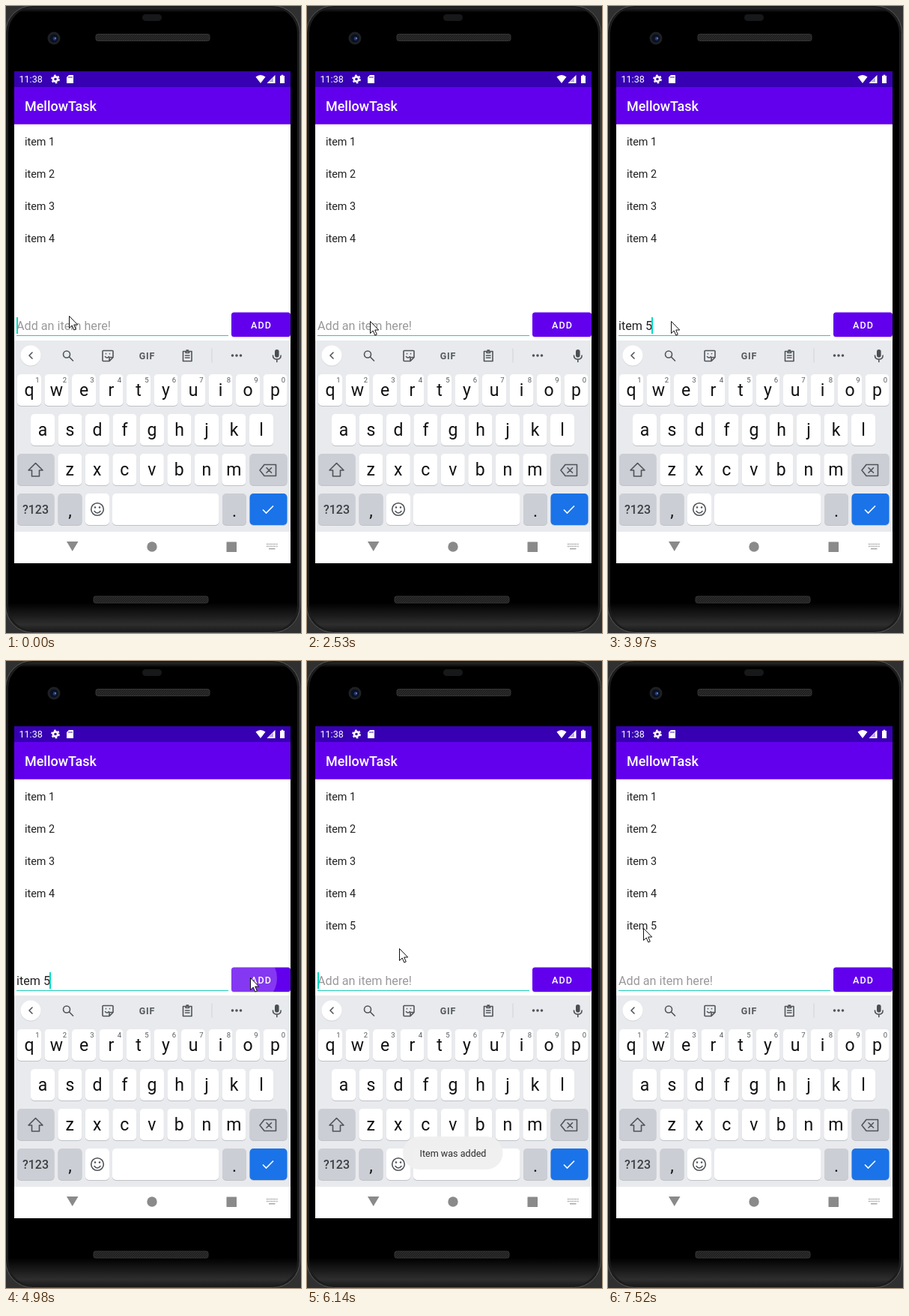
Recreate the animation shown at these times as an HTML page. Size 394 px wide and 836 px high, loop 8 s.

```html
<!DOCTYPE html>
<html lang="en">
<head>
<meta charset="utf-8">
<title>To-do list demo</title>
<style>
html, body { margin: 0; width: 100%; height: 100%; overflow: hidden; background: #303030; }
svg { display: block; position: absolute; left: 0; top: 0; }
text { font-family: Roboto, "Noto Sans", sans-serif; white-space: pre; }
.mid { text-anchor: middle; }
.medium { font-weight: 500; }
.item { font-size: 14.36px; fill: #212121; }
.field { font-size: 16.16px; fill: #212121; }
.hint { fill: #999; }
.word { font-size: 16px; fill: #5b5f64; }
.letter { font-size: 23px; fill: #111; }
.digit { font-size: 9.5px; fill: #55595e; }
.line { fill: none; stroke: #505458; stroke-width: 1.6; stroke-linejoin: round; stroke-linecap: round; }

#pointer, #caret, #ripple, #toast { animation: 8s step-end infinite; }
#pointer { animation-name: point; }
#caret { animation-name: blink; }
#ripple { animation-name: ripple; }
#toast { animation-name: toast; }

@keyframes point {
  0% { transform: translate(84px, 413px); }
  1.625% { transform: translate(84px, 420px); }
  53.375% { transform: translate(112px, 421px); }
  55.125% { transform: translate(200px, 424px); }
  57% { transform: translate(290px, 424px); }
  58.75% { transform: translate(326px, 422px); }
  69% { transform: translate(310px, 420px); }
  70.875% { transform: translate(262px, 410px); }
  72.75% { transform: translate(200px, 398px); }
  74.625% { transform: translate(150px, 388px); }
  76.75% { transform: translate(123px, 383px); }
  78.625% { transform: translate(105px, 377px); }
  80.375% { transform: translate(84px, 369px); }
  82.125% { transform: translate(66px, 362px); }
  83.75% { transform: translate(53px, 358px); }
  85.375%, 100% { transform: translate(47px, 356px); }
}
@keyframes blink {
  0%, 12%, 25%, 33.5%, 58.75%, 76.75%, 88.75% { opacity: 1; }
  6.625%, 19.625%, 31.625%, 53.375%, 72.75%, 82.125%, 94%, 100% { opacity: 0; }
}
@keyframes ripple {
  0% { r: 0; opacity: 0; }
  62.25% { r: 36px; opacity: .22; }
  63.75% { r: 60px; opacity: .22; }
  65.375% { r: 80px; opacity: .16; }
  67.25% { r: 80px; opacity: .07; }
  69%, 100% { r: 80px; opacity: 0; }
}
@keyframes toast {
  0% { opacity: 0; }
  69% { opacity: .4; }
  70.875% { opacity: .95; }
  90.25% { opacity: .7; }
  92.125% { opacity: .3; }
  94%, 100% { opacity: 0; }
}
</style>
</head>
<body>
<svg width="394" height="836" viewBox="0 0 394 836">
  <defs>
    <linearGradient id="shell" x2="0" y2="1">
      <stop offset="0" stop-color="#2a2a2a"/><stop offset=".008" stop-color="#000"/>
      <stop offset=".955" stop-color="#000"/><stop offset=".99" stop-color="#2e2e2e"/>
      <stop offset="1" stop-color="#1c1c1c"/>
    </linearGradient>
    <pattern id="mesh" width="3" height="3" patternUnits="userSpaceOnUse">
      <rect width="3" height="3" fill="#2b2b2b"/><path d="M0 3L3 0" stroke="#191919"/>
    </pattern>
    <clipPath id="buttonClip"><rect x="301" y="408.500" width="79" height="32.500" rx="3.500"/></clipPath>
  </defs>

  <!-- phone body -->
  <rect x="-.5" y="-.5" width="393" height="836" rx="36" fill="#1c1c1c" stroke="#565656"/>
  <rect x="3" y="2" width="386" height="831" rx="34" fill="url(#shell)"/>
  <rect x="182" y="11" width="26" height="9" rx="4.500" fill="#17181a"/>
  <rect x="120" y="37.500" width="152" height="9" rx="2.500" fill="url(#mesh)" stroke="#353535"/>
  <rect x="117" y="787" width="153" height="9" rx="2.500" fill="url(#mesh)" stroke="#353535"/>
  <circle cx="64" cy="43" r="8.500" fill="#1e2024"/>
  <circle cx="64" cy="43" r="5.500" fill="#0b1022"/>
  <circle cx="65" cy="43.500" r="2.400" fill="#223a70"/>
  <circle cx="66" cy="43" r="1" fill="#6c88bc"/>

  <!-- app -->
  <rect x="11" y="87" width="369" height="656" fill="#fff"/>
  <rect x="11" y="87" width="369" height="21" fill="#3700b3"/>
  <rect x="11" y="108" width="369" height="49.700" fill="#6200ee"/>
  <g fill="#fff">
    <text x="17.500" y="102" font-size="12.570">11:38</text>
    <circle cx="66" cy="97.500" r="3.100" fill="none" stroke="#fff" stroke-width="2.600"/>
    <circle cx="66" cy="97.500" r="5" fill="none" stroke="#fff" stroke-width="1.800" stroke-dasharray="2.600 2.636"/>
    <path d="M84 92h5.500q.5 0 .5 .5v10q0 .5-.5 .5h-8q-.5 0-.5-.5v-7.500z"/>
    <path d="M333.500 94.500q6.500-5 13 0L340 103z"/>
    <path d="M359.500 92v11h-11z"/>
    <path d="M366 93h1.700v-1.300h2.600v1.300h1.700v10h-6z"/>
    <text class="medium" x="25" y="140" font-size="17.960">MellowTask</text>
  </g>
  <path d="M357 95.500v6h-6z" fill="#3700b3" opacity=".35"/>
  <path d="M84 94v2M86 94v2M88 94v2" stroke="#3700b3" stroke-width=".9"/>
  <g id="list"></g>

  <!-- entry row -->
  <path d="M14 439.500H297" stroke="#1fcdbb"/>
  <text class="field hint" id="hint" x="14" y="432">Add an item here!</text>
  <text class="field" id="typed" x="14" y="432"></text>
  <path id="composing" stroke="#212121" d=""/>
  <rect id="caret" x="14" y="415" width="2" height="22" fill="#03dac5"/>
  <rect x="301" y="410" width="79" height="32.500" rx="4" fill="#000" opacity=".12"/>
  <g clip-path="url(#buttonClip)">
    <rect x="301" y="408" width="79" height="33" fill="#6200ee"/>
    <circle id="ripple" cx="326" cy="423" r="0" fill="#fff"/>
    <text class="mid medium" x="341" y="429.600" font-size="12.570" letter-spacing="1.120" fill="#fff">ADD</text>
  </g>

  <!-- keyboard -->
  <rect x="11" y="446" width="369" height="255" fill="#e8eaed"/>
  <circle cx="33" cy="467" r="13.500" fill="#d3d5d8"/>
  <circle cx="33" cy="466" r="13.500" fill="#fff"/>
  <path class="line" id="arrow" d=""/>
  <g id="tools" class="line">
    <circle cx="81" cy="464.500" r="4.500"/><path d="M84.500 468L89.500 473"/>
    <path d="M130 459.500h12q1 0 1 1v8l-5 5h-8q-1 0-1-1v-12q0-1 1-1zM143 468.500h-4q-1 0-1 1v4M132.500 467.500q2.500 3 5 0M133.500 463.500v.3M138.500 463.500v.3"/>
    <path d="M236.500 460.500h11.500v13h-11.500zM240 460.500v2h4.500v-2M241 459h2.500M239.500 466h5.500M239.500 469h5.500"/>
    <path d="M275 457V475" stroke="#cfd2d6" stroke-width="1"/>
    <path d="M302.500 466h.01M308 466h.01M313.500 466h.01" stroke-width="3.600"/>
    <text class="mid" x="188.500" y="470.500" font-size="12.500" font-weight="700" letter-spacing=".8" fill="#54585c" stroke="none">GIF</text>
  </g>
  <g id="words">
    <path d="M140.500 456V477M248.500 456V477" stroke="#c6c9cd"/>
    <text class="word mid" x="92" y="472.500"></text>
    <text class="word mid" x="194" y="472.500"></text>
    <text class="word mid" x="296" y="472.500"></text>
  </g>
  <rect x="359" y="458" width="5.600" height="10.500" rx="2.800" fill="#4a4d51"/>
  <path class="line" d="M356.500 466q0 5 5.300 5t5.300-5M361.800 471.500v3"/>
  <g id="keys"></g>
  <g class="line">
    <path d="M39.500 609.500L49 619h-4.500v8h-10v-8H30z"/>
    <path d="M345 611.500h15.500v15H345l-6-7.500zM348 615.800l6.500 6.500M354.500 615.800l-6.500 6.500"/>
    <circle cx="122" cy="671" r="8.300"/>
    <path d="M118 673.500q4 5 8 0"/>
    <path d="M119 668.500h.01M125 668.500h.01" stroke-width="2.600"/>
    <path d="M343 671.500l4.500 4.500 9.500-9.500" stroke="#fff" stroke-linecap="butt" stroke-linejoin="miter"/>
  </g>

  <!-- navigation -->
  <g fill="#8a8a8a">
    <path d="M81 714h15.500L88.700 727z"/>
    <circle cx="195" cy="721" r="6.700"/>
    <rect x="294.500" y="714.500" width="13.500" height="13.500" rx=".5"/>
  </g>
  <path d="M348 717.500h14.500M348 720.500h14.500" stroke="#a2a2a2" stroke-width="1.600" stroke-dasharray="1.600 1"/>
  <path d="M351 723.700h8.500" stroke="#a2a2a2" stroke-width="1.400"/>

  <g id="toast">
    <rect x="128" y="634" width="133.500" height="44" rx="22" fill="#f0f0f0"/>
    <text class="mid" x="195" y="661" font-size="12.570" fill="#202020">Item was added</text>
  </g>
  <path id="pointer" d="M.5 .5V16.500L4.200 13L6.800 19L9.300 18L6.700 12H11.700z" fill="#fff" stroke="#111"/>
</svg>

<script>
const $ = id => document.getElementById(id);
const LOOP = 8000, CLEAR = 5230;

const typing = [[0, ''], [2680, 'i'], [2810, 'it'], [2950, 'ite'], [3080, 'item'],
  [3220, 'item '], [3510, 'item 5'], [CLEAR, '']];
const guesses = {
  i: ['i', 'I', "I'm"],
  it: ['it', "it's", 'its'],
  ite: ['ite', 'item', 'items'],
  item: ['item', 'items', 'itemized']
};

function label(x, y, cls, str) {
  return `<text class="${cls}" x="${x}" y="${y}">${str}</text>`;
}

function key(x, y, w, str = '', fill = '#fff', base = 28.5) {
  const box = (dy, color) =>
    `<rect x="${x}" y="${y + dy}" width="${w}" height="42" rx="5" fill="${color}"/>`;
  return box(1, '#bfc2c6') + box(0, fill) + label(x + w / 2, y + base, 'letter mid', str);
}

function row(str, x, y) {
  return [...str].map((c, i) => key(x + i * 36.5, y, 32, c)).join('');
}

const GREY = '#cbced4';
$('keys').innerHTML =
  row('qwertyuiop', 15, 491) + row('asdfghjkl', 33, 544) + row('zxcvbnm', 69.3, 597) +
  [...'1234567890'].map((d, i) => label(42 + i * 36.5, 502, 'digit mid', d)).join('') +
  key(15, 597, 49.5, '', GREY) + key(325.5, 597, 50, '', GREY) +
  key(15, 650, 49.5, '', GREY) + key(69.5, 650, 32, ',', GREY, 31) + key(106, 650, 32) +
  key(142, 650, 142.5) + key(289, 650, 32, '.', GREY, 31) + key(325.5, 650, 50, '', '#1a73e8') +
  '<text class="mid medium" x="39.5" y="677" font-size="16" fill="#3c4043">?123</text>';

$('list').innerHTML =
  [1, 2, 3, 4, 5].map(n => label(25, 142.5 + n * 43, 'item', 'item ' + n)).join('');
const added = $('list').lastElementChild;
const words = $('words').querySelectorAll('text');

function show(el, on) {
  el.style.visibility = on ? 'visible' : 'hidden';
}

function render(t) {
  const text = typing.filter(s => s[0] <= t).pop()[1];
  const word = text.trim();
  const typed = $('typed');
  typed.textContent = text;
  const width = text ? typed.getComputedTextLength() : 0;
  $('caret').setAttribute('x', 14 + Math.max(0, Math.round(width - 1)));
  show($('hint'), !text);

  const guess = guesses[word];
  const under = guess ? width - (text.length - word.length) * 4 : 0;
  $('composing').setAttribute('d', under ? `M14 434.5h${under}` : '');

  const suggesting = t >= 2680 && t < 3970;
  show($('tools'), !suggesting);
  show($('words'), suggesting && t < 3660);
  $('words').style.opacity = guess ? 1 : .5;
  if (guess) words.forEach((el, i) => el.textContent = guess[i]);
  $('arrow').setAttribute('d', suggesting ? 'M31 462l4 4-4 4' : 'M35 462l-4 4 4 4');
  show(added, t >= CLEAR);
}

let start;
function tick(now) {
  start ??= now;
  render((now - start) % LOOP);
  requestAnimationFrame(tick);
}
render(0);
requestAnimationFrame(tick);
</script>
</body>
</html>
```
